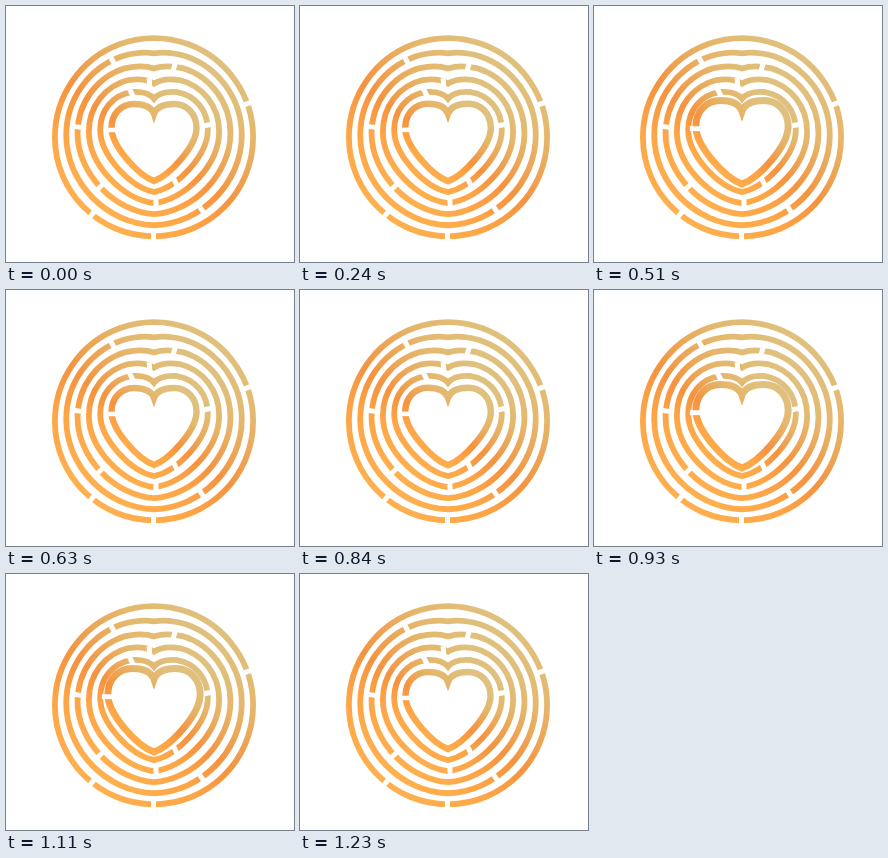
Animation of 288 by 256 pixels, one loop 1500 ms. Source, as an HTML page:

```html
<!DOCTYPE html>
<html lang="en">
<head>
<meta charset="utf-8">
<title>Beating heart maze</title>
<style>
  html, body { margin: 0; width: 100%; height: 100%; overflow: hidden; background: #fff; }
  svg { display: block; width: 288px; height: 256px; }
</style>
</head>
<body>
<svg viewBox="0 0 288 256" fill="none">
  <defs>
    <linearGradient id="tone" x1=".8" y1=".1" x2=".2" y2=".92">
      <stop offset="0" stop-color="#dfc07c"/>
      <stop offset=".2" stop-color="#e5b76c"/>
      <stop offset=".53" stop-color="#f4933f"/>
      <stop offset=".75" stop-color="#fea546"/>
      <stop offset="1" stop-color="#ffb04e"/>
    </linearGradient>
  </defs>
  <g id="rings" stroke="url(#tone)" stroke-width="5.8"></g>
  <g id="gaps" stroke="#fff" stroke-width="5"></g>
  <g id="heart">
    <path id="outline" fill="#fff" stroke="url(#tone)" stroke-width="6.4" stroke-miterlimit="8"/>
    <path d="M100 124H111" stroke="#fff" stroke-width="4.5"/>
  </g>
</svg>
<script>
const CX = 148, CY = 131.2, RADIUS = 99.1;
const LOOP = 1500, STEP = 30, BEAT = 420, GROWTH = 0.14, BEAT_Y = 139;
const byId = id => document.getElementById(id);

// Right half of the heart, top to bottom: three curves, x measured from the axis.
const heartHalf = [
  [0, 108], [2.5, 101], [9, 98], [20, 98], [33, 98], [42.5, 108],
  [42.5, 122], [42.5, 140], [16, 169], [0, 175]
];
const circleHalf = arcPoints([0, 20, 90, 180]);

// Points where each ring is open, from the outside in.
const ringGaps = [
  [[242, 97.5], [86, 208.5], [147.5, 230]],
  [[106, 53.5], [195.5, 203.5]],
  [[168, 61.5], [72, 121], [94, 181]],
  [[150, 197], [143.5, 77]],
  [[202, 119], [169.5, 176.5], [125, 86]]
];

// Bezier points of a circle, split at the given angles from the top.
function arcPoints(degrees) {
  const angles = degrees.map(d => d * Math.PI / 180);
  const at = (a, h) => [
    RADIUS * (Math.sin(a) + h * Math.cos(a)),
    CY + RADIUS * (h * Math.sin(a) - Math.cos(a))
  ];
  const points = [at(angles[0], 0)];
  for (let i = 1; i < angles.length; i++) {
    const a = angles[i - 1], b = angles[i];
    const h = 4 / 3 * Math.tan((b - a) / 4);
    points.push(at(a, h), at(b, -h), at(b, 0));
  }
  return points;
}

// Closed outline between circle (k = 0) and heart (k = 1).
function blend(k) {
  const half = circleHalf.map(([x, y], i) =>
    [x + (heartHalf[i][0] - x) * k, y + (heartHalf[i][1] - y) * k]);
  const right = half.map(([x, y]) => [CX + x, y]);
  const left = half.map(([x, y]) => [CX - x, y]).reverse();
  return `M${right[0]}C${[...right.slice(1), ...left.slice(1)].join(" ")}Z`;
}

function add(parent, d) {
  const path = document.createElementNS("http://www.w3.org/2000/svg", "path");
  path.setAttribute("d", d);
  byId(parent).append(path);
}

ringGaps.forEach((gaps, i) => {
  add("rings", blend(i / 5));
  for (const [x, y] of gaps) {
    const reach = 4.8 / Math.hypot(x - CX, y - CY);
    const dx = (x - CX) * reach, dy = (y - CY) * reach;
    add("gaps", `M${x - dx} ${y - dy}L${x + dx} ${y + dy}`);
  }
});
byId("outline").setAttribute("d", blend(1));

function pulse(t, start) {
  const p = (t - start) / BEAT;
  return p > 0 && p < 1 ? (1 - Math.cos(2 * Math.PI * p)) / 2 : 0;
}

function draw() {
  const t = Math.floor(performance.now() % LOOP / STEP) * STEP;
  const scale = 1 + GROWTH * (pulse(t, 210) + pulse(t, 810));
  byId("heart").setAttribute("transform",
    `translate(${CX} ${BEAT_Y}) scale(${scale}) translate(${-CX} ${-BEAT_Y})`);
  requestAnimationFrame(draw);
}
draw();
</script>
</body>
</html>
```
